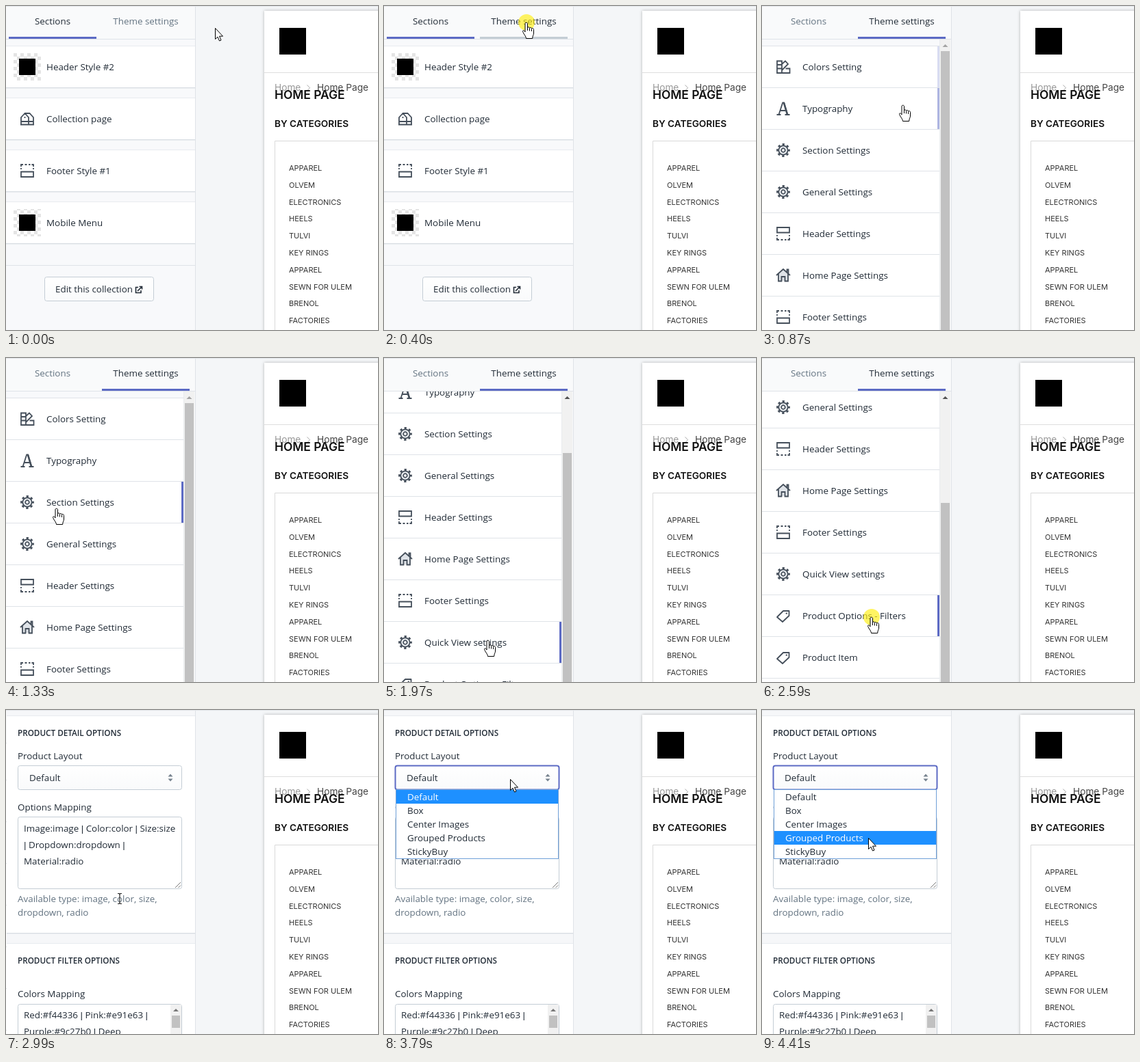
An HTML page for the animation above (4.49 s loop, 543 px wide and 474 px high).

```html
<!DOCTYPE html>
<html lang="en">
<head>
<meta charset="utf-8">
<title>Theme settings</title>
<style>
html, body { margin: 0; width: 100%; height: 100%; overflow: hidden; background: #f4f6f8; }
svg { display: block; width: 543px; height: 474px; }
text { font: 13.4px "Open Sans", "Noto Sans", sans-serif; fill: #212b36; white-space: pre; }
.cap { font: 600 11.7px "Open Sans", "Noto Sans", sans-serif; }
.mid { text-anchor: middle; }
.soft { fill: #637381; }
.bar { font-family: "Liberation Sans", sans-serif; }
.shop { font: 11px Inter, sans-serif; fill: #333; }
.crumb { font: 13.7px Inter, sans-serif; fill: #444; }
.head { font: 600 17.4px Inter, sans-serif; fill: #111; }
.sub { font: 600 13.6px Inter, sans-serif; fill: #111; }
.icon { fill: none; stroke: #454f5b; stroke-width: 1.8; }
</style>
</head>
<body>
<svg id="stage" viewBox="0 0 543 474"></svg>
<script>
const LOOP = 4490;
const INDIGO = '#5c6ac4', LINE = '#dfe3e8', EDGE = '#c4cdd5', BG = '#f8f9fb';

// ---------- markup helpers ----------
const rect = (x, y, w, h, fill, more = '') =>
  `<rect x="${x}" y="${y}" width="${w}" height="${h}" fill="${fill}" ${more}/>`;
const text = (x, y, s, cls = '', more = '') =>
  `<text x="${x}" y="${y}" class="${cls}" ${more}>${s}</text>`;
// the value lists use a slim divider
const values = (x, y, s) => text(x, y, s.replace(/\|/g, '<tspan class="bar">|</tspan>'));
const path = (d, more = '') => `<path d="${d}" ${more}/>`;
const group = (id, body, more = '') => `<g id="${id}" ${more}>${body}</g>`;
const box = (x, y, w, h, more = '', fill = '#fff') =>
  rect(x + .5, y + .5, w - 1, h - 1, fill, `stroke="${EDGE}" rx="3" ${more}`);
const card = (y, h, w = 276) =>
  rect(0, y, w, h, '#fff') + rect(0, y - 1, w, 1, '#e8ebef') +
  rect(0, y + h, w, 1, '#d8dde3') + rect(0, y + h + 1, w, 1, '#ebeef1');

// ---------- icons, centred on 0,0 ----------
const house = path('M-10 0L0 -9L10 0M-7 -2V8.5H-2.5V2H2.5V8.5H7V-2M5.5 -5V-8.5H7.5V-3');
const dashes = 'M-9 -2V-4M-9 -6V-9H-6M-3.5 -9H-.5M2 -9H4.5M6.5 -9H9V-6M9 -4V-2';
const frame = path(dashes) + path('M-9 1.5H9V9H-9Z');
const icons = {
  gear: '<circle r="8.4" stroke-width="3" stroke-dasharray="3.2 3.397" stroke-dashoffset="1.6"/>' +
    '<circle r="6.7" fill="#eef1f4"/><circle r="2.8" fill="#fff"/>',
  head: `<g transform="scale(1 -1)">${frame}</g>`,
  foot: frame,
  house: path('M-7 -2L0 -8L7 -2V8H-7Z', 'fill="#dfe3e8" stroke="none"') + house,
  tag: path('M-9 2L0 -7H8.5V0L-1 9Z', 'stroke-linejoin="round"') +
    '<circle cx="4.8" cy="-3.4" r="1.2" fill="#454f5b" stroke="none"/>',
  type: path('M-9.5 9H-3.5M2.5 9H9.5M-6.5 9L-.8 -8.5H1.2L6.5 9M-4.5 3H4.5') +
    path('M1 -8L6 9', 'stroke-width="2.6"'),
  swatch: path('M-9 -8.5H-2V9H-9ZM-9 -3H-2M-9 2.5H-2M-2 -4L3 -8.5L7 -4L-2 5M3.5 2.5H9.5V9H-2'),
  shop: path('M-9 8.500V-2L-3.500 -8L2 -2V8.500M-3.500 -8H3.500L9 -2V8.500M-10 8.500H10M-9 4H9M-3.500 -3V-1'),
};
const icon = (name, y) => `<g class="icon" transform="translate(31 ${y})">${icons[name]}</g>`;
const thumb = y => rect(11, y - 20, 40, 40, 'url(#check)') + rect(19, y - 12, 24, 24, '#000');

// ---------- shop preview ----------
const links = ['APPAREL', 'OLVEM', 'ELECTRONICS', 'HEELS', 'TULVI', 'KEY RINGS',
  'APPAREL', 'SEWN FOR ULEM', 'BRENOL', 'FACTORIES'];
const preview =
  rect(276, 0, 267, 474, '#f4f6f8') + rect(276, 0, 1, 474, LINE) +
  rect(377, 7, 180, 480, '#fff', 'filter="url(#shade)"') +
  rect(377, 97, 166, 1, '#dedede') + rect(399, 32, 39, 39, '#000') +
  text(392, 124, 'Home', 'crumb', 'style="fill:#999"') +
  path('M439.5 115.5L443.5 119.8L439.5 124', 'fill="none" stroke="#aaa"') +
  text(454, 124, 'Home Page', 'crumb') +
  text(392, 136, 'HOME PAGE', 'head') + text(392, 177, 'BY CATEGORIES', 'sub') +
  path('M543 197.5H392.5V474', 'fill="none" stroke="#d9d9d9"') +
  links.map((s, i) => text(413, 241 + 24.8 * i, s, 'shop')).join('');

// ---------- first tab ----------
const sections = [['Header Style #2'], ['Collection page', 'shop'], ['Footer Style #1', 'foot'], ['Mobile Menu']]
  .map(([label, name], i) => {
    const y = 89 + 76 * i;
    return card(y - 30, 60) + (name ? icon(name, y) : thumb(y)) + text(59, y + 5, label);
  }).join('') +
  rect(0, 379, 276, 1, LINE) + box(56, 396, 160, 36, '', 'url(#sheen)') +
  text(72, 419, 'Edit this collection') +
  path('M193 411.5H189.5V419.5H197V416M192 417L197.5 411.5M194.5 410.5H198.5V414.5',
    'fill="none" stroke="#212b36" stroke-width="1.6"');

// ---------- second tab ----------
const rows = [['Colors Setting', 'swatch'], ['Typography', 'type'], ['Section Settings', 'gear'],
  ['General Settings', 'gear'], ['Header Settings', 'head'], ['Home Page Settings', 'house'],
  ['Footer Settings', 'foot'], ['Quick View settings', 'gear'],
  ['Product Options - Filters', 'tag'], ['Product Item', 'tag'], ['', '']];
const list = rows.map(([label, name], i) => {
  const y = 89 + 61 * i;
  return rect(0, y - 30, 259, 60, '#fff') + rect(0, y - 31, 259, 1, LINE) +
    rect(256, y - 30, 3, 61, INDIGO, `id="bar${i}"`) +
    (name ? icon(name, y) + text(59, y + 5, label) : '');
}).join('');
const settings = group('list', list) + rect(259, 49, 1, 425, '#e8ebee') +
  rect(260, 49, 15, 425, '#f1f1f1') +
  path('M263.5 60L267.5 56L271.5 60Z', 'id="up"') +
  rect(261, 66, 13, 500, '#c1c1c1', 'id="thumb"');

const tabs = rect(0, 0, 276, 48, '#f9fafb') + rect(0, 48, 276, 1, LINE) +
  text(68, 27, 'Sections', 'mid', 'id="tabA"') + text(204, 27, 'Theme settings', 'mid', 'id="tabB"') +
  rect(4, 45, 128, 3, INDIGO, 'id="lineA"') + rect(140, 45, 128, 3, INDIGO, 'id="lineB"');

// ---------- options panel ----------
const panel = rect(0, 0, 276, 474, '#f6f7f9') + card(9, 317) + card(342, 140) +
  text(16, 38, 'PRODUCT DETAIL OPTIONS', 'cap') + text(16, 72, 'Product Layout') +
  box(16, 81, 240, 36, 'id="select"', 'url(#sheen)') + text(33, 104, 'Default') +
  path('M235.5 97.5L239 93.5L242.5 97.5ZM235.5 100.5L239 104.5L242.5 100.5Z', 'fill="#75818d"') +
  text(16, 147, 'Options Mapping') + box(16, 156, 240, 106) +
  ['Image:image | Color:color | Size:size', '| Dropdown:dropdown |', 'Material:radio']
    .map((s, i) => values(25, 178 + 24 * i, s)).join('') +
  path('M246 260L254 252M250.5 260L254 256.5', 'stroke="#777"') +
  text(16, 281, 'Available type: image, color, size,', 'soft') +
  text(16, 301, 'dropdown, radio', 'soft') +
  text(16, 371, 'PRODUCT FILTER OPTIONS', 'cap') + text(16, 420, 'Colors Mapping') +
  box(16, 430, 240, 80) +
  values(25, 451, 'Red:#f44336 | Pink:#e91e63 |') + values(25, 475, 'Purple:#9c27b0 | Deep') +
  rect(239, 431, 16, 43, '#f1f1f1') + path('M243 441L247 437L251 441Z', 'fill="#777"') +
  rect(241, 447, 12, 18, '#c1c1c1');

const choices = ['Default', 'Box', 'Center Images', 'Grouped Products', 'StickyBuy'];
const menu = rect(17.5, 116.5, 237, 101, '#fff', 'stroke="#6f9fd8"') +
  rect(18, 117, 236, 20, '#1e90ff', 'id="mark"') +
  choices.map((s, i) => text(34, 132 + 20 * i, s, '', `id="choice${i}"`)).join('');

// ---------- pointers, hot spot on 0,0 ----------
const ink = 'fill="#fff" stroke="#000" stroke-linejoin="round"';
const pointers =
  group('arrow', path('M.5 .5V16.5L4 13.2L6.5 19L9 18L6.5 12.2H11.5Z', ink)) +
  group('hand', path('M-2 14V1.8C-2 -.3 1.5 -.3 1.5 1.8V8C1.5 6.4 4.5 6.5 4.5 8.4' +
    'C4.6 7 7.5 7.2 7.5 9.2C7.8 8 10.5 8.3 10.5 10.5V16C10.5 18.5 8.7 19.5 8.7 23.5' +
    'H-.5C-.5 20.5 -3.5 18 -5 14.5C-6.5 11.7 -4 10.5 -2 14Z', ink) +
    path('M1.5 8V12M4.5 8.5V12.5M7.5 9.5V13', 'stroke="#000" fill="none"')) +
  group('beam', path('M-3 -7.5H-1L0 -6.5L1 -7.5H3M0 -6.5V6.5M-3 7.5H-1L0 6.5L1 7.5H3',
    'fill="none" stroke="#222" stroke-width="1.2"'));

document.getElementById('stage').innerHTML = `
<defs>
  <pattern id="check" x="11" y="9" width="10" height="10" patternUnits="userSpaceOnUse">
    ${rect(0, 0, 10, 10, '#fff') + rect(0, 0, 5, 5, '#e4e4e4') + rect(5, 5, 5, 5, '#e4e4e4')}
  </pattern>
  <linearGradient id="sheen" x2="0" y2="1">
    <stop stop-color="#fff"/><stop offset="1" stop-color="#f9fafb"/>
  </linearGradient>
  <filter id="shade"><feDropShadow dx="0" dy="0" stdDeviation="2" flood-opacity=".28"/></filter>
  <clipPath id="side">${rect(0, 0, 276, 474, '#000')}</clipPath>
</defs>
${rect(0, 0, 276, 474, BG)}
<g clip-path="url(#side)">
  ${group('sections', sections) + group('settings', settings) + tabs + group('panel', panel)}
</g>
${preview + rect(0, 0, 543, 1, '#e3e6e9') + group('menu', menu)}
<circle id="click" r="12" fill="#ffee10" opacity=".65"/>
${group('pointer', pointers)}`;

// ---------- motion ----------
const el = {};
document.querySelectorAll('[id]').forEach(n => { el[n.id] = n; });
const set = (id, name, v) => el[id].setAttribute(name, v);
const show = (id, on) => set(id, 'display', on ? 'inline' : 'none');
const clamp = v => Math.max(0, Math.min(1, v));
const ease = v => { v = clamp(v); return v * v * (3 - 2 * v); };

const bursts = [[90, 400, 5], [560, 560, 1], [720, 1180, 7], [1270, 1730, 7], [1800, 2280, 7],
  [2360, 2590, 4], [2750, 3230, 7], [3300, 3790, 7], [3940, 4410, 7]];
const ticks = [0];
for (const [a, b, n] of bursts)
  for (let i = 0; i < n; i++) ticks.push(Math.round((a + (b - a) * i / Math.max(1, n - 1)) / 10) * 10);
const snap = t => ticks.filter(k => k <= t).pop();

const trail = [
  [0, 305, 32, 'arrow'], [90, 290, 39, 'arrow'], [240, 235, 34, 'hand'], [320, 214, 27, 'hand'],
  [400, 208, 24, 'hand'], [560, 208, 24, 'hand'], [720, 208, 46, 'hand'], [870, 206, 145, 'hand'],
  [1030, 118, 195, 'hand'], [1180, 67, 210, 'hand'], [1270, 74, 220, 'hand'], [1420, 115, 330, 'hand'],
  [1570, 146, 405, 'hand'], [1730, 152, 413, 'hand'], [2360, 153, 412, 'hand'], [2510, 158, 386, 'hand'],
  [2590, 160, 379, 'hand'], [2750, 160, 379, 'hand'], [2830, 161, 362, 'arrow'], [2990, 166, 276, 'beam'],
  [3150, 177, 165, 'beam'], [3230, 181, 125, 'arrow'], [3380, 184, 103, 'arrow'], [3790, 184, 101, 'arrow'],
  [3940, 183, 112, 'arrow'], [4090, 177, 143, 'arrow'], [4240, 163, 174, 'arrow'], [4330, 157, 183, 'arrow'],
  [4410, 155, 187, 'arrow']];
function pointerAt(t) {
  let i = trail.length - 1;
  while (trail[i][0] > t) i--;
  const a = trail[i], b = trail[i + 1] || a;
  const k = b === a ? 0 : (t - a[0]) / (b[0] - a[0]);
  return { x: a[1] + (b[1] - a[1]) * k, y: a[2] + (b[2] - a[2]) * k, kind: a[3] };
}

// row, pointer enters, pointer leaves
const hovers = [[0, 690, 755], [1, 795, 950], [2, 950, 1270], [3, 1280, 1380], [4, 1380, 1490],
  [5, 1490, 1640], [6, 1640, 1690], [7, 1690, 2060], [8, 2060, 2110], [9, 2110, 2410], [8, 2410, 9999]];
const glow = (row, t) => hovers.reduce((m, [r, a, b]) =>
  r === row ? Math.max(m, Math.min(clamp((t - a) / 150), clamp((b + 150 - t) / 150))) : m, 0);

function draw(now) {
  const t = snap(now % LOOP);
  const second = t >= 560, hot = t >= 240 && !second;

  show('sections', !second);
  show('settings', second);
  el.tabA.style.fill = second ? '#637381' : '#212b36';
  el.tabB.style.fill = second || hot ? '#212b36' : '#637381';
  show('lineA', !second);
  show('lineB', second || hot);
  set('lineB', 'fill', second ? INDIGO : EDGE);

  const scroll = Math.round(100 * (ease((t - 1560) / 220) + ease((t - 1990) / 220)));
  set('list', 'transform', `translate(0 ${-scroll})`);
  set('thumb', 'y', 66 + .73 * scroll);
  set('up', 'fill', scroll ? '#505050' : '#a3a3a3');
  rows.forEach((_, i) => set('bar' + i, 'opacity', glow(i, t)));

  show('panel', t >= 2750);
  const slide = 276 * Math.pow(1 - clamp((t - 2700) / 340), 3);
  set('panel', 'transform', `translate(${Math.round(slide)} 0)`);
  const focus = t >= 3460;
  set('select', 'stroke', focus ? INDIGO : EDGE);
  set('select', 'stroke-width', focus ? 2 : 1);

  const p = pointerAt(t);
  const picked = Math.max(0, Math.floor((p.y - 117) / 20));
  show('menu', t >= 3610);
  set('mark', 'y', 117 + 20 * picked);
  choices.forEach((_, i) => { el['choice' + i].style.fill = i === picked ? '#fff' : '#212b36'; });

  const pressed = (t >= 400 && t < 560) || (t >= 2590 && t < 2750) || (t >= 3460 && t < 3610);
  show('click', pressed);
  set('click', 'transform', `translate(${p.x} ${p.y})`);
  set('pointer', 'transform', `translate(${Math.round(p.x)} ${Math.round(p.y)})`);
  for (const kind of ['arrow', 'hand', 'beam']) show(kind, kind === p.kind);
}

const start = performance.now();
function loop() {
  draw(performance.now() - start);
  requestAnimationFrame(loop);
}
loop();
</script>
</body>
</html>
```
